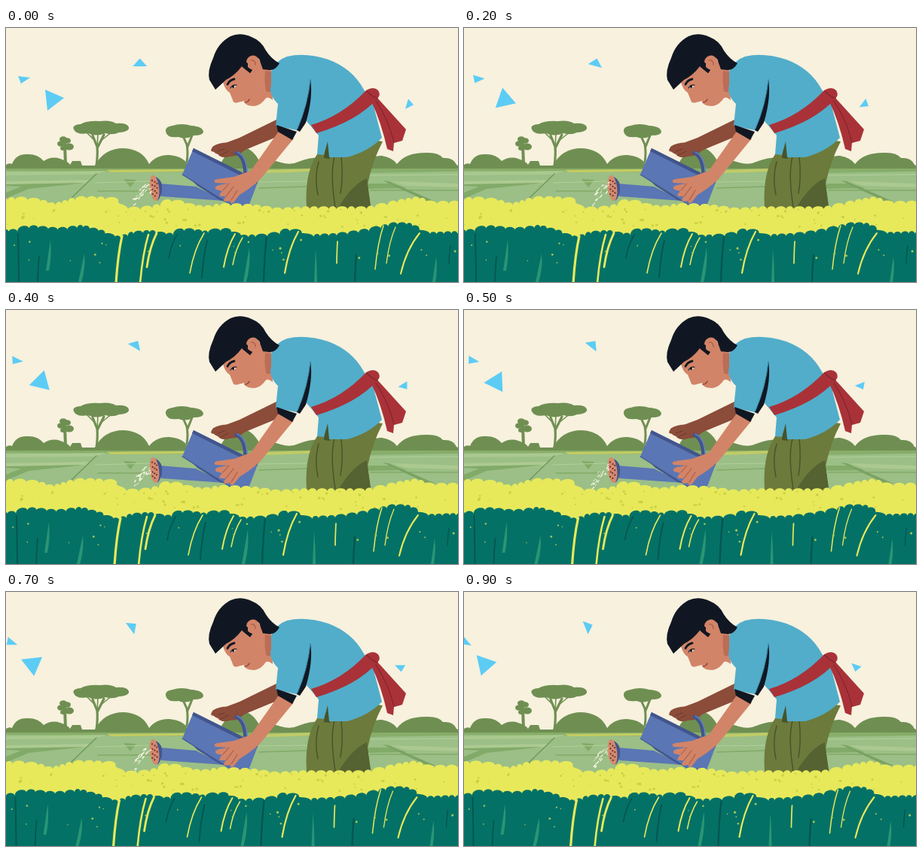
An HTML page with a canvas that plays this animation: 600x338 px, repeating every 1 s.

```html
<!DOCTYPE html>
<html lang="en">
<head>
<meta charset="utf-8">
<title>Watering the field</title>
<style>
html, body { margin: 0; width: 100%; height: 100%; overflow: hidden; background: #f7f1de; }
canvas { display: block; width: 600px; height: 338px; }
</style>
</head>
<body>
<canvas id="stage" width="600" height="338"></canvas>
<script>
const c = document.getElementById('stage').getContext('2d');
const TAU = Math.PI * 2;
c.lineCap = c.lineJoin = 'round';

function fill(color, d) {
  c.fillStyle = color;
  c.fill(new Path2D(d));
}
function line(color, width, d) {
  c.strokeStyle = color;
  c.lineWidth = width;
  c.stroke(new Path2D(d));
}
function oval(color, x, y, rx, ry = rx, turn = 0) {
  c.fillStyle = color;
  c.beginPath();
  c.ellipse(x, y, rx, ry, turn, 0, TAU);
  c.fill();
}
function random(seed) {
  return () => (seed = seed * 16807 % 2147483647) / 2147483647;
}

// Flying triangles: start, drift per second, start angle, turn per second, corners
const kites = [
  { x: 61, y: 95, dx: -37, dy: 1, turn: 128, pts: [[16, -2], [-6, 15], [-9, -13]] },
  { x: 23, y: 68, dx: -23.5, dy: -1.5, turn: 47, pts: [[-7, -4], [9, -2], [-3, 6]] },
  { x: 177.7, y: 47.6, dx: -15, dy: -1.5, turn: 76, pts: [[0, -7], [9.5, 3.3], [-9.5, 3.3]] },
  { x: 535, y: 101.3, dx: -16, dy: -1.5, turn: 103, pts: [[-1, -7], [6, 1], [-5, 6.5]] }
];

function drawKites(t) {
  for (const k of kites) {
    c.save();
    c.translate(k.x + k.dx * t, k.y + k.dy * t);
    c.rotate(k.turn * t * Math.PI / 180);
    fill('#5cccf5', 'M' + k.pts.join('L') + 'Z');
    c.restore();
  }
}

function drawLand() {
  const hill = '#6f8f52';
  // trees
  fill(hill, `M90 135Q87 129 99 128Q108 123 124 124Q139 122 146 127Q161 126 163 132Q164 138 150 139
    Q142 143 132 140Q119 145 109 140Q94 143 90 135Z`);
  line(hill, 3.2, 'M120 184Q122 168 121 158L115 143M121 160L130 142');
  line(hill, 1.6, 'M121 159L122 140M117 149L106 138M126 150L141 138');
  fill(hill, `M212 138Q211 131 221 130Q233 126 246 130Q261 131 262 138Q262 143 249 143
    Q239 149 229 145Q214 147 212 138Z`);
  line(hill, 3, 'M240 178Q242 165 240 155L235 144M241 158L247 143');
  for (const [x, y, r] of [[76, 148, 5], [73, 154, 5], [81, 150, 5], [84, 158, 6], [76, 160, 4]]) oval(hill, x, y, r, r * .75);
  line(hill, 4, 'M78 154L79 182');
  // hills and hut
  fill(hill, `M0 190V182Q4 179 8 181Q13 168 27 168Q42 167 50 177Q61 170 72 174Q82 177 85 182L88 177H99L101 183
    H118Q130 160 156 160Q181 161 190 181Q199 169 216 169Q234 170 241 181L285 180Q297 158 313 158Q328 160 338 180
    Q350 173 365 179Q378 183 388 178Q402 172 420 172L480 180Q486 169 499 170Q514 173 519 181
    Q530 166 557 166Q574 165 580 173Q594 172 598 182L600 183V190Z`);
  fill('#9bbf86', 'M0 188H600V260H0Z');
  fill('#88ad68', 'M0 187H600V190L300 192L0 190Z');
  fill('#a9c98f', 'M0 192L134 190L118 195L0 196Z');
  fill('#acca92', 'M0 204L112 202L106 207L0 209Z');
  fill('#c5cd60', 'M133 189L238 188V191L140 192Z');
  fill('#c0cb68', 'M340 189L408 187V191L346 193Z');
  fill('#82aa68', 'M0 208L106 206L30 214L0 227V219L20 211L0 210Z');
  line('#6f9858', 1.3, 'M120 194L84 229');
  fill('#82aa68', 'M156 201L173 202L165 212Z');
  line('#b3d09a', 1, 'M118 206L190 204M334 205L400 204M480 196L600 195');
  line('#82aa68', 1.3, 'M122 217H190M336 213L400 211M481 192L600 190M483 216H600');
  fill('#82aa68', 'M478 207L512 207L532 213L480 214Z');
  fill('#7aa262', 'M500 203L508 204L570 231L560 231Z');
  fill('#abc990', 'M512 204L600 207V212L530 210Z');
}

function drawCan() {
  const dark = '#42558c', blue = '#5a76b4';
  // far arm and its hand
  fill('#8b4c39', `M363 120L310 146Q297 151 288 154Q277 154 273 160Q270 166 278 164L283 170Q289 174 297 171
    L306 170L318 162L364 143Z`);
  // spout and body
  fill(blue, 'M204 207L252 211L290 230L206 224Z');
  fill(dark, 'M240 196L254 210L284 229L300 233L276 206Z');
  fill(blue, 'M249 160L335 203L322 237L299 236L234 195Z');
  fill(dark, 'M249 160L335 203L333 207L247 164Z');
  line('#435991', 1.2, 'M234 195L299 236H322');
  line(dark, 5.5, 'M306 166Q317 171 318 193');
  line('#6e8bc6', 1.3, 'M307 165Q319 170 320 191');
  fill('#8b4c39', 'M274 158Q285 151 301 153Q311 156 307 163L294 171Q286 173 283 168Q278 168 274 163Z');
  line('#6d382d', 1, 'M281 164L290 161M285 169L295 164');
}

function drawBody() {
  const shirt = '#52adca', skin = '#d28468', ink = '#111722';
  // trousers
  fill('#6c7a3c', 'M413 168Q394 196 400 250H485L480 208Q486 178 500 151L480 148Z');
  fill('#556231', 'M479 200Q456 210 435 250H486L480 208Z');
  line('#46532b', 1.4, 'M436 171Q430 194 437 238M445 172Q448 197 444 220M415 178Q409 199 414 222');
  fill('#475329', 'M424 152L429 150L430 174L422 173Z');
  // neck and face
  fill(skin, 'M335 48L352 52L354 96Q346 89 343 96Q336 104 328 104L316 80Z');
  fill('#bc6d55', 'M344 57L352 58L353 84Q344 88 343 78Z');
  fill(skin, `M288 72Q291 83 297 86L301 96Q302 101 308 99L316 97L318 101Q323 105 331 103Q342 99 345 84
    L340 45L315 45Z`);
  // shirt
  fill(shirt, `M352 58Q358 43 373 38Q397 32 428 42Q460 54 475 82L487 100L499 146Q482 164 453 172L429 172L427 151
    L422 169L413 168L415 143L405 131L398 123L390 137L358 130L361 101Q348 88 352 76Z`);
  fill(ink, 'M404 68Q408 92 398 126L390 138L386 136Q400 105 404 68Z');
  line('#3b8ba8', 1, 'M404 69Q401 101 387 134');
  // sash
  fill('#a93238', 'M405 129Q446 117 478 83Q488 77 494 83Q498 89 493 94Q466 124 412 140Z');
  fill('#a93238', 'M485 92L493 93L531 135L526 150L515 153L514 164L506 161Q498 125 485 98Z');
  line('#822530', 1.2, 'M479 84Q484 90 493 94M491 97Q508 123 515 152');
  // near arm
  fill(skin, `M363 136L382 147L337 202Q325 213 310 222L303 231Q298 236 298 230L291 231Q287 230 292 224
    L285 224Q281 223 287 217L279 215Q275 211 283 209L295 207L278 206Q274 202 281 201L303 198Q313 194 325 190Z`);
  line('#a85d49', 1.1, 'M296 207L288 216M302 211L292 224M307 216L299 229');
  fill(ink, 'M359 129L386 138L380 149L361 138Z');
  // hair
  fill(ink, `M278 82L270 69Q267 57 275 40Q281 20 298 11Q311 5 326 12Q339 17 345 30Q352 41 363 47
    Q358 56 350 56L341 55L336 41L324 38L320 48L327 55L324 60L313 51Q304 63 292 69Z`);
  // ear and features
  oval(skin, 328, 46, 9, 9.5, -.3);
  fill(ink, 'M317 44L321 47L321 53L327 56L324 60L314 52Z');
  line('#a85d49', 1.2, 'M325 43Q331 42 331 49');
  line(ink, 2.8, 'M294 75Q297 69 303 68');
  oval('#f7eee2', 302, 78, 3, 1.7, -.4);
  oval(ink, 301.5, 78, 1.5, 2);
  line(ink, 1.1, 'M298 80Q301 75 306 76');
  line('#8f3f38', 1.4, 'M317 99Q321 99 323 95');
}

function drawRose(step) {
  const rnd = random(91 + step * 577);
  fill('#42558c', 'M199 198Q208 203 207 214Q207 224 201 230Z');
  oval('#d68a6c', 197, 213, 6.2, 17, -.12);
  for (let i = 0; i < 11; i++) {
    oval('#59313a', 194 + i % 3 * 3 + rnd() * .8, 202 + i * 2.1 + rnd(), 1.1);
  }
  for (let i = 0; i < 24; i++) {
    const far = rnd(), x = 193 - far * 22, y = 205 + rnd() * 13 + far * far * 22;
    line('#f8f6e5', .7 + rnd() * .7, `M${x} ${y}l${-1 - rnd() * 2} ${1 + rnd() * 2}`);
  }
}

// Bumpy top edge of a crop layer, following a few heights
function bumps(color, knots, size, seed) {
  const rnd = random(seed);
  let k = 0, d = `M-20 340L-20 ${knots[0][1]}`;
  for (let x = -20; x < 630;) {
    const next = x + size * (.6 + rnd() * .8);
    while (k < knots.length - 2 && knots[k + 1][0] < next) k++;
    const [[x0, y0], [x1, y1]] = knots.slice(k, k + 2);
    const y = y0 + (y1 - y0) * (next - x0) / (x1 - x0);
    d += `C${x - 2} ${y - size * .55} ${next + 1} ${y - size * .65} ${next} ${y}`;
    x = next;
  }
  fill(color, d + 'V340Z');
}

function blade([x, y, u, v, w], color) {
  line(color, w, `M${x} ${y}Q${u + (x - u) * .3} ${y + (v - y) * .4} ${u} ${v}`);
}

const cropTop = [[-20, 232], [40, 230], [68, 239], [100, 229], [153, 231], [164, 245], [190, 243], [210, 239],
  [226, 230], [244, 238], [270, 243], [290, 238], [330, 240], [370, 245], [400, 243], [485, 243], [505, 239],
  [525, 234], [550, 230], [570, 236], [640, 235]];
const leafTop = [[-20, 272], [15, 273], [35, 267], [75, 271], [105, 267], [128, 273], [155, 283], [170, 276],
  [195, 274], [222, 278], [240, 270], [268, 275], [295, 270], [320, 281], [360, 278], [385, 269], [406, 280],
  [445, 278], [480, 273], [522, 263], [542, 265], [565, 277], [640, 274]];
const stalks = [[154, 277, 146, 340, 3.2], [189, 275, 178, 340, 2.6], [200, 273, 187, 318, 2.8],
  [263, 273, 244, 326, 1.6], [304, 274, 289, 318, 2], [314, 279, 301, 315, 1.5], [388, 271, 370, 326, 2.2],
  [440, 284, 439, 313, 1.7], [501, 263, 490, 321, 1.5], [517, 265, 505, 313, 1.3], [549, 273, 524, 327, 2]];
const darkBlades = [[16, 274, 17, 340, 1.8], [44, 304, 42, 340, 1.7], [227, 275, 216, 306, 1.5],
  [267, 283, 260, 332, 1.8], [346, 278, 342, 338, 2.2], [465, 302, 463, 340, 2.2], [590, 290, 588, 313, 1.4]];
const lightBlades = [[59, 282, 55, 323], [104, 300, 98, 338], [323, 292, 317, 338],
  [411, 294, 411, 338], [571, 304, 568, 338]];

function drawCrop(t) {
  c.save();
  c.translate(-5 * t, 0);
  bumps('#e7e95b', cropTop, 13, 28);
  const rnd = random(417);
  for (let i = 0; i < 65; i++) {
    oval('#cbd044', rnd() * 620, 241 + rnd() * 24, .7 + rnd() * 1.2);
  }
  bumps('#047166', leafTop, 12, 76);
  darkBlades.forEach(b => blade(b, '#05554f'));
  for (const [x, y, u, v] of lightBlades) {
    fill('#299575', `M${x} ${y}Q${x + 2} ${(y + v) / 2} ${u + 2} ${v}H${u - 2}Z`);
  }
  stalks.forEach(s => blade(s, '#e7e95b'));
  for (let i = 0; i < 26; i++) {
    oval('#a8c657', rnd() * 620, 280 + rnd() * 36, .7 + rnd() * .9);
  }
  c.restore();
}

function draw(now) {
  const step = Math.floor(now % 1000 / 100), t = step / 10;
  c.fillStyle = '#f7f1de';
  c.fillRect(0, 0, 600, 338);
  drawKites(t);
  drawLand();
  drawCan();
  drawBody();
  drawRose(step);
  drawCrop(t);
}

const start = performance.now();
function frame() {
  draw(performance.now() - start);
  requestAnimationFrame(frame);
}
frame();
</script>
</body>
</html>
```
